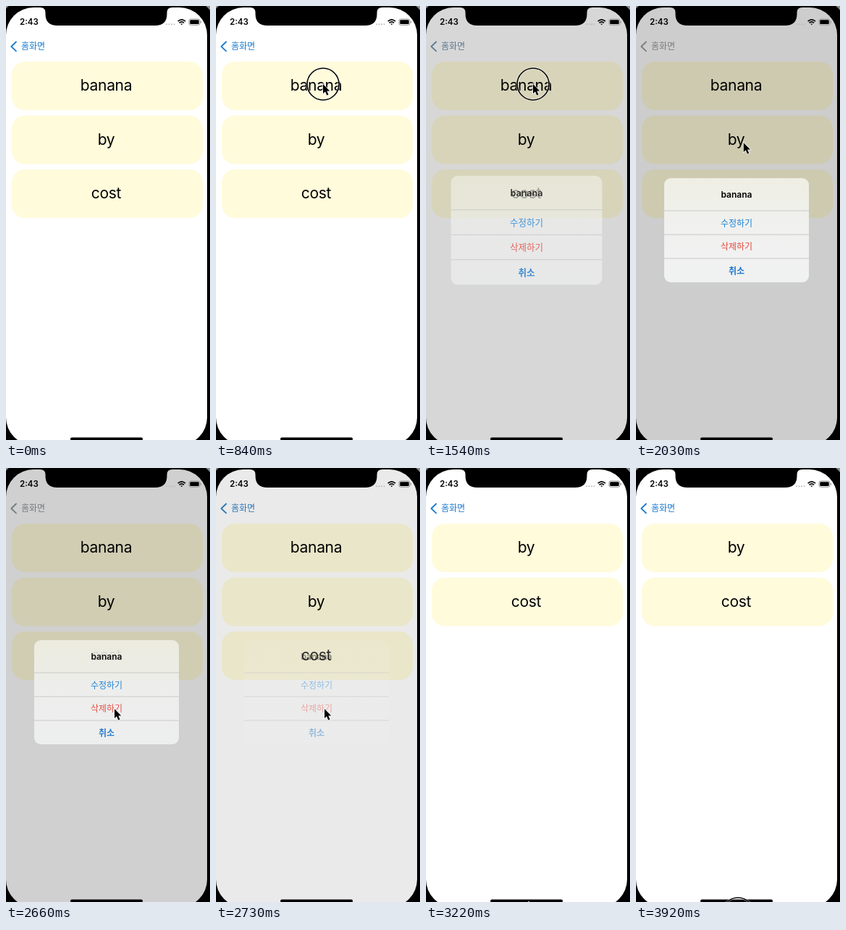
Write an HTML page that moves like this. It is 282 px wide and 600 px high and loops after 3990 ms.

```html
<!DOCTYPE html>
<html lang="ko">
<head>
<meta charset="utf-8">
<title>Word cards</title>
<style>
html, body { margin: 0; width: 100%; height: 100%; overflow: hidden; background: #8a8a8a; }
svg { display: block; }
text { font: 12px "Noto Sans CJK KR", "Noto Sans CJK JP", sans-serif; }
.latin { font-family: Inter, sans-serif; }
.word { font-size: 21px; letter-spacing: -.3px; text-anchor: middle; }
#labels { text-anchor: middle; }
.bold { font-weight: 600; }
#nav path { fill: none; stroke: currentColor; stroke-width: 1.8; stroke-linecap: round; stroke-linejoin: round; }
#nav text { fill: currentColor; }
</style>
</head>
<body>
<svg width="282" height="600" viewBox="0 0 282 600">
  <defs>
    <linearGradient id="glass" x2="0" y2="1">
      <stop offset="0" stop-color="#efeee3"/>
      <stop offset=".45" stop-color="#f0f1ef"/>
      <stop offset="1" stop-color="#f0f1f1"/>
    </linearGradient>
    <rect id="screen" y="2" width="278" height="605" rx="38"/>
  </defs>

  <rect x="-14" y="-14" width="308" height="640" rx="54"/>
  <use href="#screen" fill="#fff"/>
  <g id="nav">
    <path d="M14 49.5 L7.3 56 L14 62.3"/>
    <text x="21" y="60">홈화면</text>
  </g>
  <g id="cards"></g>
  <use id="shade" href="#screen"/>

  <g id="alert">
    <rect id="panel" x="39" y="238" width="200" height="144" rx="9" fill="url(#glass)"/>
    <rect id="press" x="39" y="316" width="200" height="33" opacity=".08"/>
    <path id="lines" d="M39 283H239M39 316H239M39 349H239" stroke="#c8c8c8"/>
    <g id="labels">
      <text class="latin bold" x="139" y="265">banana</text>
      <text x="139" y="304.5" fill="#1a7fd4">수정하기</text>
      <text x="139" y="337" fill="#e5483f">삭제하기</text>
      <text x="139" y="370.5" fill="#1a78cf" style="font-weight:700">취소</text>
    </g>
  </g>

  <path d="M47 0V2Q54.500 2 54.500 9V11Q54.500 27 71 27H206Q222.500 27 222.500 11V9Q222.500 2 230 2V0Z"/>
  <text class="latin bold" x="19" y="26.300" style="font-size:11.500px">2:43</text>
  <path d="M222 25.300H234" stroke="#bbb" stroke-width="2" stroke-linecap="round" stroke-dasharray="0 3.500"/>
  <g fill="none" stroke="#000" stroke-width="1.700">
    <path d="M237.600 21.200Q242.800 16.600 248 21.200M239.500 23.300Q242.800 20.500 246.100 23.300"/>
    <path d="M241.200 24.500H244.400L242.800 26.200Z" fill="#000" stroke="none"/>
  </g>
  <rect x="253" y="18" width="15" height="8.400" rx="2.400" fill="none" stroke="#999"/>
  <rect x="254.300" y="19.300" width="12.400" height="5.800" rx="1.200"/>
  <path d="M269.500 20.800V23.600" stroke="#999"/>
  <rect x="89" y="596.500" width="100" height="4" rx="2"/>

  <g id="pointer">
    <g id="ring" fill="none">
      <circle r="22" stroke="#fff" stroke-width="3" stroke-opacity=".6"/>
      <circle r="22" stroke="#000" stroke-width="1.600"/>
    </g>
    <path d="M0 0V13L3 10.300L5.200 15.400L7.500 14.400L5.300 9.500H9.300Z" stroke="#fff" stroke-width="1.400" paint-order="stroke"/>
  </g>
</svg>
<script>
const LOOP = 3990, STEP = 70, PITCH = 74.5;
const $ = id => document.getElementById(id);
const set = (el, name, value) => el.setAttribute(name, value);
const progress = (t, from, to) => Math.min(1, Math.max(0, (t - from) / (to - from)));
const easeOut = (p, power) => 1 - (1 - p) ** power;
const smooth = p => p * p * (3 - 2 * p);
const mix = (a, b, p) => a + (b - a) * p;
const within = (t, from, to) => t >= from && t < to;

$('cards').innerHTML = ['banana', 'by', 'cost'].map(word => `<g>
  <rect x="8" y="77" width="264" height="67" rx="18" fill="#fffbdb"/>
  <text class="latin word" x="138.5" y="117">${word}</text></g>`).join('');
const cards = [...$('cards').children];

function pointerAt(t) {
  if (t >= 3850) return [141, 616];
  if (t >= 2870) {
    const p = easeOut(progress(t, 2870, 3290), 2.5);
    return [mix(150, 142, p), mix(333, 603, p)];
  }
  if (t >= 1960) {
    const p = easeOut(progress(t, 1960, 2310), 2);
    return [mix(148, 150, p), mix(108, 333, p)];
  }
  const p = smooth(progress(t, 0, 350));
  return [mix(145, 148, p), mix(612, 108, p)];
}

function draw(t) {
  // Alert opens with a shrink, then fades without scaling
  const opened = easeOut(progress(t, 1330, 1820), 3);
  const shown = opened * (1 - easeOut(progress(t, 2655, 2955), 3));
  const scale = 1 + .24 * (1 - opened);
  set($('alert'), 'transform', `translate(139 310) scale(${scale}) translate(-139 -310)`);
  set($('alert'), 'display', shown > 0 ? 'inline' : 'none');
  set($('panel'), 'opacity', shown ** 2);
  set($('lines'), 'opacity', shown ** .5);
  set($('labels'), 'opacity', shown);
  set($('shade'), 'opacity', .195 * shown);
  set($('press'), 'display', within(t, 2520, 2660) ? 'inline' : 'none');

  const tint = [[26, 154], [123, 154], [208, 154]].map(([a, b]) => mix(a, b, shown ** 2));
  $('nav').style.color = `rgb(${tint})`;

  // The first card fades while the others move up
  const removed = smooth(progress(t, 2870, 3150));
  cards.forEach((card, i) => {
    set(card, 'transform', `translate(0 ${PITCH * (i ? i - removed : 0)})`);
    set(card, 'opacity', i ? 1 : 1 - removed);
  });

  set($('pointer'), 'transform', `translate(${pointerAt(t)})`);
  const held = within(t, 560, 1610) || within(t, 2520, 2660) || t >= 3850;
  set($('ring'), 'display', held ? 'inline' : 'none');
}

const start = performance.now();
function tick() {
  const t = (performance.now() - start) % LOOP;
  draw(Math.floor(t / STEP) * STEP);
  requestAnimationFrame(tick);
}
tick();
</script>
</body>
</html>
```
